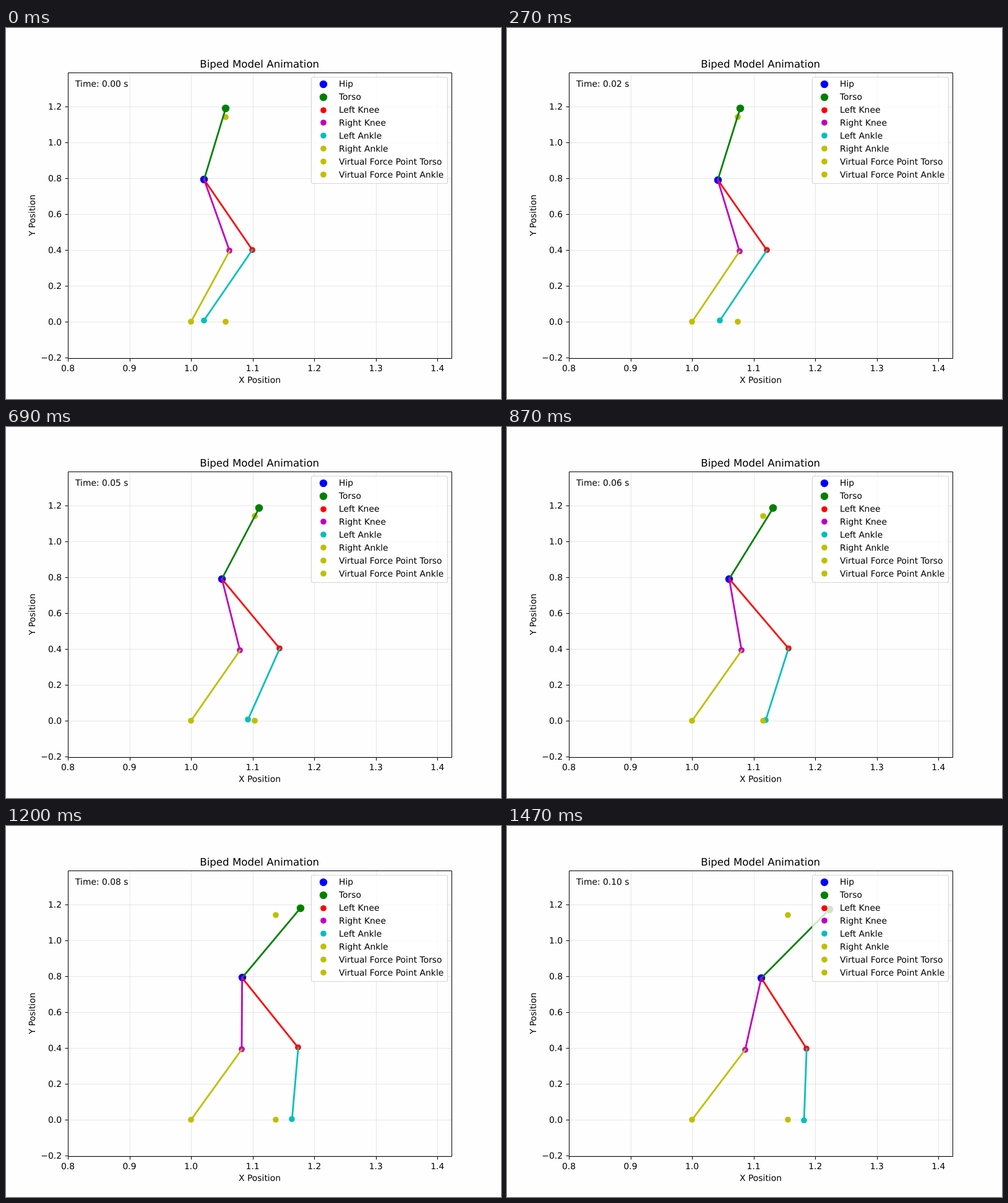
Recreate the animation shown at these times as an HTML page. Size 800 px wide and 600 px high, loop 1.5 s.

```html
<!DOCTYPE html>
<html lang="en">
<head>
<meta charset="utf-8">
<title>Biped Model Animation</title>
<style>
html, body { margin: 0; width: 100%; height: 100%; overflow: hidden; background: #fefefe; }
svg { display: block; width: 800px; height: 600px; }
text { font: 13.89px "DejaVu Sans", sans-serif; text-rendering: geometricPrecision; }
</style>
</head>
<body>
<svg id="stage" viewBox="0 0 800 600"></svg>
<script>
const BLUE = '#00f', GREEN = '#008000', RED = '#f00';
const MAGENTA = '#bf00bf', CYAN = '#00bfbf', OLIVE = '#bfbf00';
const BIG = 6.25, SMALL = 4.86;
const STEP = 30, COUNT = 50;

const svg = document.getElementById('stage');

function set(el, attrs) {
  for (const k in attrs) el.setAttribute(k, attrs[k]);
}
function add(tag, attrs) {
  const el = document.createElementNS('http://www.w3.org/2000/svg', tag);
  set(el, attrs);
  svg.appendChild(el);
  return el;
}
function label(str, x, y, anchor = 'start', extra = {}) {
  const el = add('text', { x, y, 'text-anchor': anchor, ...extra });
  el.textContent = str;
  return el;
}
const path = (d, stroke, extra) => add('path', { d, stroke, fill: 'none', ...extra });
const dot = (fill, r) => add('circle', { fill, r });

// Markers sit on whole pixels, lines do not
const place = (el, x, y) => set(el, { cx: Math.round(x), cy: Math.round(y) });

// Plot units to pixels
const X = x => 100 + 995.5 * (x - 0.8);
const Y = y => 475 - 290 * y;

// Monotone cubic through a few key angles
const keys = [0, 9, 17, 33, 44, 49];

function curve(...v) {
  const n = v.length, m = [];
  const h = v.slice(1).map((_, k) => keys[k + 1] - keys[k]);
  const d = h.map((w, k) => (v[k + 1] - v[k]) / w);
  for (let k = 1; k < n - 1; k++) {
    const a = 2 * h[k] + h[k - 1], b = h[k] + 2 * h[k - 1];
    m[k] = d[k - 1] * d[k] > 0 ? (a + b) / (a / d[k - 1] + b / d[k]) : 0;
  }
  m[0] = (3 * d[0] - m[1]) / 2;
  m[n - 1] = (3 * d[n - 2] - m[n - 2]) / 2;
  return i => {
    let k = 0;
    while (k < n - 2 && i > keys[k + 1]) k++;
    const s = (i - keys[k]) / h[k], q = 1 - s;
    return v[k] * (1 + 2 * s) * q * q + v[k + 1] * s * s * (3 - 2 * s)
      + h[k] * s * q * (m[k] * q - m[k + 1] * s);
  };
}

// Lean of each link from the vertical, in degrees
const lean = {
  rightShin: curve(9, 11.1, 11.3, 11.7, 12, 12.45),
  rightThigh: curve(-5.95, -5.05, -4.9, -1.9, 1.5, 3.75),
  trunk: curve(5.05, 5.2, 7.2, 11.35, 14.95, 16.1),
  leftThigh: curve(11.3, 11.5, 13.05, 14, 12.3, 10.6),
  leftShin: curve(-11.3, -11, -9.25, -3.95, -0.7, -0.6)
};
const LENGTH = 0.4;

function link([x, y], degrees, up) {
  const a = degrees * Math.PI / 180;
  return [x + LENGTH * Math.sin(a), y + up * LENGTH * Math.cos(a)];
}

// The right foot is planted; every other joint follows from it
function poseAt(i) {
  const rightAnkle = [1, 0];
  const rightKnee = link(rightAnkle, lean.rightShin(i), 1);
  const hip = link(rightKnee, lean.rightThigh(i), 1);
  const torso = link(hip, lean.trunk(i), 1);
  const leftKnee = link(hip, lean.leftThigh(i), -1);
  const leftAnkle = link(leftKnee, lean.leftShin(i), -1);
  const drift = 1.0563 + 0.00203 * i;
  return {
    hip, torso, leftKnee, rightKnee, leftAnkle, rightAnkle,
    forceTorso: [drift, 1.141], forceAnkle: [drift, 0]
  };
}

const series = [
  ['hip', 'Hip', BLUE, BIG],
  ['torso', 'Torso', GREEN, BIG],
  ['leftKnee', 'Left Knee', RED, SMALL],
  ['rightKnee', 'Right Knee', MAGENTA, SMALL],
  ['leftAnkle', 'Left Ankle', CYAN, SMALL],
  ['rightAnkle', 'Right Ankle', OLIVE, SMALL],
  ['forceTorso', 'Virtual Force Point Torso', OLIVE, SMALL],
  ['forceAnkle', 'Virtual Force Point Ankle', OLIVE, SMALL]
];
const links = [
  ['hip', 'torso', GREEN],
  ['hip', 'leftKnee', RED],
  ['hip', 'rightKnee', MAGENTA],
  ['leftKnee', 'leftAnkle', CYAN],
  ['rightKnee', 'rightAnkle', OLIVE]
];

// Grid, ticks and tick labels
const GRID = { 'stroke-opacity': 0.3 };
for (let k = 0; k < 7; k++) {
  const v = 0.8 + k / 10, x = Math.round(X(v)) + 0.5;
  path(`M${x} 72V534`, '#b0b0b0', GRID);
  path(`M${x} 534.5V539.5`, '#000');
  label(v.toFixed(1), X(v), 555, 'middle');
}
for (let k = -1; k < 7; k++) {
  const v = k / 5, y = Math.round(Y(v)) + 0.5;
  path(`M100 ${y}H720`, '#b0b0b0', GRID);
  path(`M95.5 ${y}H100.5`, '#000');
  label(v.toFixed(1).replace('-', '\u2212'), 90, y + 4.5, 'end');
}

const dots = series.map(([, , color, r]) => dot(color, r));
const bars = links.map(([, , color]) =>
  add('line', { stroke: color, 'stroke-width': 2.78, 'stroke-linecap': 'square' }));

path('M100.5 72.5H720.5V534.5H100.5Z', '#000');
label('Biped Model Animation', 409.7, 64, 'middle', { style: 'font-size:16.67px' });
label('X Position', 410, 574, 'middle');
label('Y Position', 0, 0, 'middle', { transform: 'translate(47 303) rotate(-90)' });
const clock = label('', 112, 95);

// Legend
add('rect', {
  x: 493.5, y: 79.5, width: 220, height: 172, rx: 2.8,
  fill: '#fff', 'fill-opacity': 0.8,
  stroke: '#ccc', 'stroke-opacity': 0.8, 'stroke-width': 1.2
});
series.forEach(([, name, color, r], k) => {
  place(dot(color, r), 513, 90.8 + 20.88 * k);
  label(name, 538, 95 + 21 * k);
});

function draw(ms) {
  const i = Math.floor(ms / STEP) % COUNT;
  const pose = poseAt(i);
  series.forEach(([name], k) => {
    const [x, y] = pose[name];
    place(dots[k], X(x), Y(y));
  });
  links.forEach(([from, to], k) => {
    const [x1, y1] = pose[from], [x2, y2] = pose[to];
    set(bars[k], { x1: X(x1), y1: Y(y1), x2: X(x2), y2: Y(y2) });
  });
  clock.textContent = `Time: ${(i * 0.002).toFixed(2)} s`;
}

let start;
function tick(now) {
  if (start === undefined) start = now;
  draw(Math.max(0, now - start));
  requestAnimationFrame(tick);
}
draw(0);
requestAnimationFrame(tick);
</script>
</body>
</html>
```
